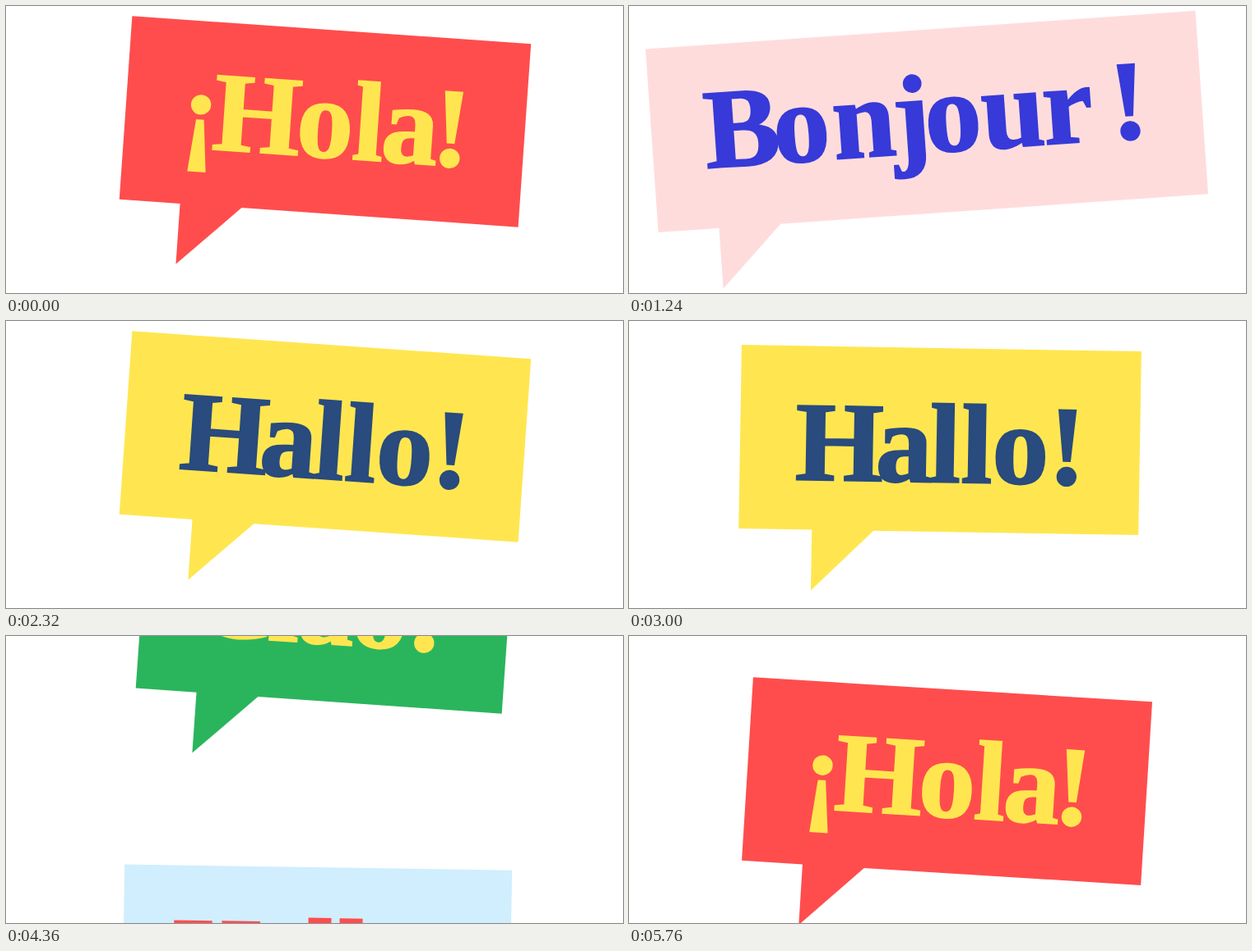
Write an HTML page that moves like this. It is 750 by 350 pixels and loops after 5800 ms.

```html
<!DOCTYPE html>
<html lang="en">
<head>
<meta charset="utf-8">
<title>Greetings</title>
<style>
  html, body { margin: 0; width: 100%; height: 100%; overflow: hidden; background: #fff; }
  svg { display: block; width: 750px; height: 350px; }
  text { font: bold 138px "Liberation Serif", "Times New Roman", serif; text-anchor: middle; stroke-width: 2; }
</style>
</head>
<body>
<svg id="stage" viewBox="0 0 750 350"></svg>
<script>
const STEP = 40, TURN = 1160, LOOP = 5 * TURN, LEAD = 520;

// x holds the centre of each letter, measured from the middle of the bubble.
const bubbles = [
  { word: "¡Hola!", fill: "#ff4d4d", ink: "#ffe650", width: 486, tail: 74, base: -142.5,
    x: [-152, -82.5, 0.5, 53.5, 104, 154] },
  { word: "Bonjour !", fill: "#ffdcdc", ink: "#373ad8", width: 670, tail: 74, base: -148,
    x: [-225, -153, -76.5, -18.5, 31.7, 105, 171.5, 215, 246] },
  { word: "Hallo!", fill: "#ffe650", ink: "#294b7d", width: 486, tail: 89, base: -134.5,
    x: [-122, -43.5, 6.5, 45, 98, 154.5] },
  { word: "Ciao!", fill: "#2ab55d", ink: "#ffe650", width: 446, tail: 74, base: -144,
    x: [-108, -49, 2.5, 67.5, 123] },
  { word: "Hello!", fill: "#d0eefd", ink: "#ff4d4d", width: 471, tail: 74, base: -139.5,
    x: [-122, -45, 6, 44, 97, 153.5] }
];

// [time, vertical shift, tilt]: rise, wobble, rest, dip, leave
const keys = [
  [0, 326, 0], [160, 326, 0], [520, 0, 4], [600, 0, -4], [640, 0, 0],
  [1160, 0, 0], [1200, 4.5, 0.95], [1240, 11, 1.9], [1320, -77.5, 3.8],
  [1360, -125.5, 4], [1560, -365.5, 4], [LOOP, -365.5, 4]
];

function add(parent, tag, attrs) {
  const el = document.createElementNS("http://www.w3.org/2000/svg", tag);
  for (const name in attrs) el.setAttribute(name, attrs[name]);
  return parent.appendChild(el);
}

function build({ word, fill, ink, width, tail, base, x }) {
  const group = add(stage, "g", {});
  const left = -width / 2;
  add(group, "path", {
    fill,
    d: `M${left} -298h${width}v224H${left + tail + 75}L${left + tail} 0v-74H${left}z`
  });
  add(group, "text", { x: x.join(" "), y: base, fill: ink, stroke: ink }).textContent = word;
  return group;
}

function pose(t) {
  const i = keys.findIndex(key => key[0] > t);
  const [t0, y0, a0] = keys[i - 1], [t1, y1, a1] = keys[i];
  const k = (t - t0) / (t1 - t0);
  return [y0 + (y1 - y0) * k, a0 + (a1 - a0) * k];
}

const stage = document.getElementById("stage");
const groups = bubbles.map(build);

function draw() {
  const now = Math.floor((performance.now() + 1) / STEP) * STEP;
  groups.forEach((group, i) => {
    const [y, angle] = pose((now + LEAD + LOOP - i * TURN) % LOOP);
    group.setAttribute("transform", `translate(375 ${326.5 + y}) rotate(${angle})`);
  });
  requestAnimationFrame(draw);
}
draw();
</script>
</body>
</html>
```
